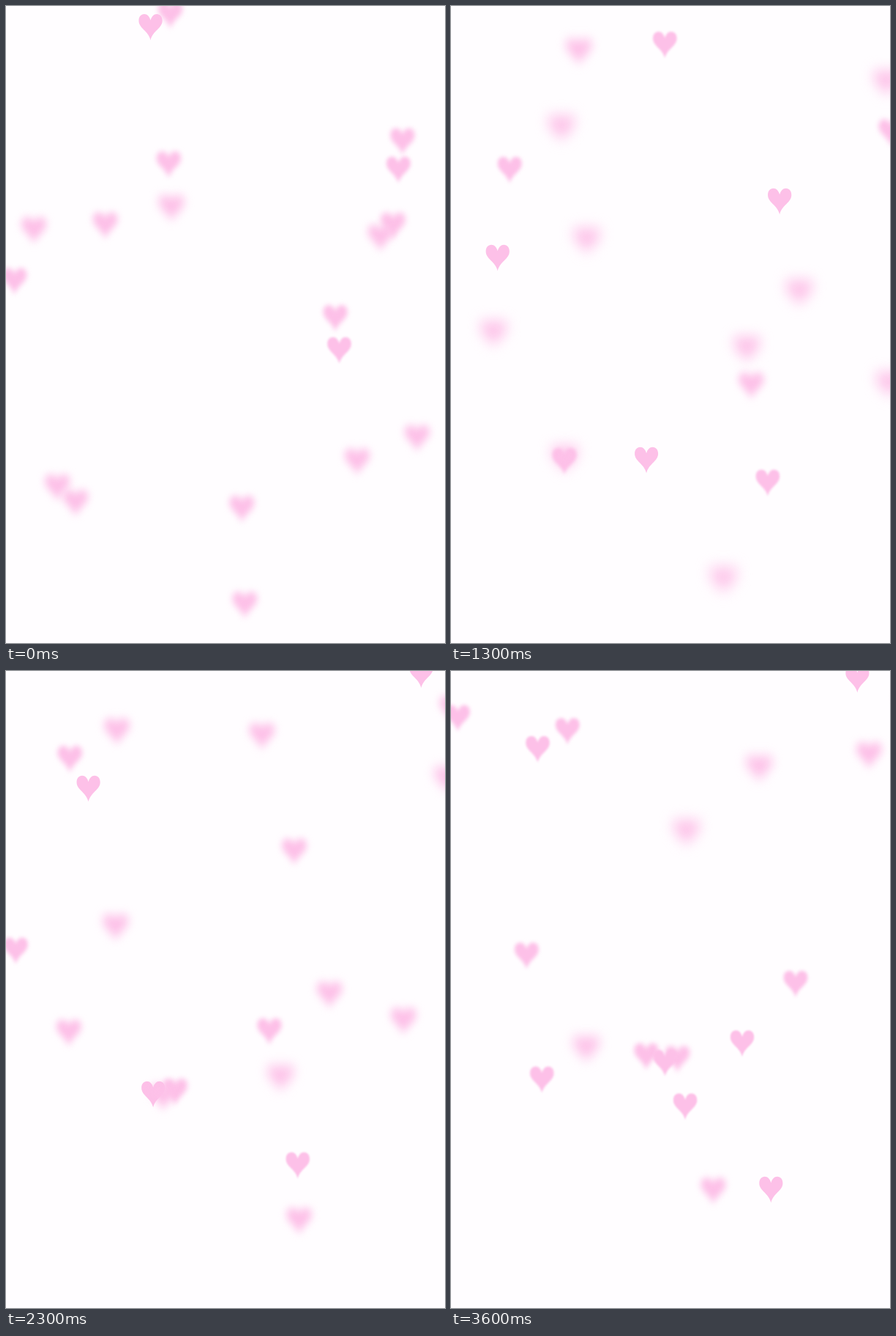
Recreate the animation shown at these times as an HTML page with a canvas. Size 600 px wide and 869 px high, loop 3700 ms.

```html
<!DOCTYPE html>
<html lang="en">
<head>
<meta charset="utf-8">
<title>Drifting hearts</title>
<style>
html, body { margin: 0; width: 100%; height: 100%; overflow: hidden; background: #fffdff; }
canvas { display: block; }
</style>
</head>
<body>
<canvas id="stage" width="600" height="869"></canvas>
<script>
const ctx = document.getElementById('stage').getContext('2d');
const LOOP = 3700, STEP = 100, LAST = LOOP / STEP - 1;
const MAX_BLUR = 9.5, MAX_SHIFT = 9, GROWTH = .1;

const heart = new Path2D(
  'M0-9C-1.5-14.5-4.5-17.5-8.5-17.5C-13-17.5-16-14-16-8.5C-16 2-3 5 0 18' +
  'C3 5 16 2 16-8.5C16-14 13-17.5 8.5-17.5C4.5-17.5 1.5-14.5 0-9Z');

// Start and end point of each straight path, in the order the hearts come into focus
const paths = [
  [197, 28, 117, 105], [454, 468, 319, 593], [534, 221, 710, 77],
  [649, 196, 566, 110], [221, 9, 414, 126], [525, 296, 313, 212],
  [318, 682, 177, 508], [131, 295, -57, 427], [557, 585, 802, 477],
  [475, 617, 354, 705], [475, -62, 619, 42], [90, 673, 264, 523],
  [33, 301, 157, 80], [539, 182, 673, -52], [447, 423, 306, 526],
  [219, 213, 7, 62], [8, 372, 123, 556], [694, 112, 555, 11],
  [322, 813, 437, 707], [507, 312, 397, 507], [65, 652, 291, 533],
  [659, 555, 469, 425], [220, 270, 101, 386]
];

const mix = (a, b, k) => a + (b - a) * k;

// Swings between 0 (sharp) and 1 (softest); each heart focuses two steps
// after the one before, and the swing slows down along each group of 13.
function softness(i, step) {
  const focus = 2 * i + 1;
  const rate = .062 * .92 ** (i % 13);
  return Math.abs(((step - focus) * rate + 3) % 2 - 1);
}

function drawHeart([x0, y0, x1, y1], soft, progress) {
  const shift = soft * MAX_SHIFT, scale = 1 + soft * GROWTH;
  ctx.save();
  ctx.filter = soft < .04 ? 'none' : `blur(${soft * MAX_BLUR}px)`;
  ctx.translate(mix(x0, x1, progress) + shift, mix(y0, y1, progress) + shift);
  ctx.scale(scale, scale);
  ctx.fill(heart);
  ctx.restore();
}

function tick() {
  const step = Math.floor(performance.now() % LOOP / STEP);
  ctx.fillStyle = '#fffdff';
  ctx.fillRect(0, 0, 600, 869);
  ctx.fillStyle = '#fdc0e8';
  paths.forEach((path, i) => drawHeart(path, softness(i, step), step / LAST));
  requestAnimationFrame(tick);
}
tick();
</script>
</body>
</html>
```
